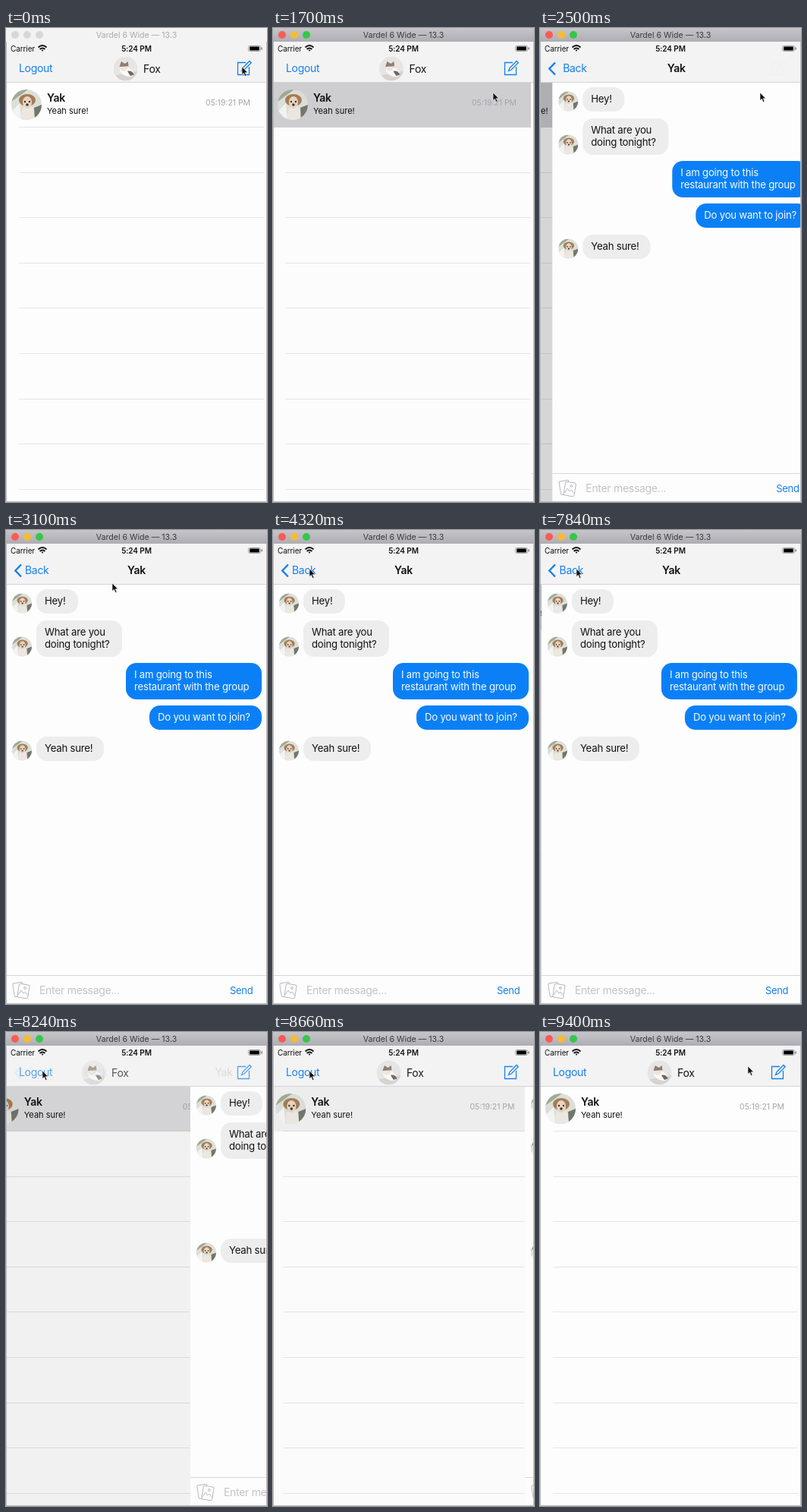
Recreate the animation shown at these times as an HTML page. Size 344x624 px, loop 9420 ms.

```html
<!DOCTYPE html>
<html lang="en">
<head>
<meta charset="utf-8">
<title>Chat navigation</title>
<style>
  html, body { margin: 0; width: 100%; height: 100%; overflow: hidden; background: #fdfdfd; }
  svg { display: block; width: 344px; height: 624px; }
  text { font-family: Inter, Roboto, sans-serif; font-size: 14px; letter-spacing: -.3px; fill: #111; }
  .bold { font-weight: 600; }
  .mid { text-anchor: middle; }
  .blue { fill: #147fec; }
  .msg { font-size: 13.2px; letter-spacing: -.23px; }
  .small { font-size: 11px; letter-spacing: 0; }
  .bar { font-size: 10px; letter-spacing: -.1px; }
  .line { fill: none; stroke: #147fec; }
</style>
</head>
<body>
<svg viewBox="0 0 344 624">
  <defs>
    <clipPath id="content"><rect y="71" width="344" height="553"/></clipPath>
    <clipPath id="disc"><circle r="20"/></clipPath>
    <linearGradient id="steel" x2="0" y2="1">
      <stop stop-color="#c6c5ca"/><stop offset="1" stop-color="#aeadb3"/>
    </linearGradient>
    <g id="pup" clip-path="url(#disc)">
      <rect x="-20" y="-20" width="40" height="40" fill="#dcdfd9"/>
      <path d="M-20 -4L2 -20H-14L-20 -14Z" fill="#9fab94"/>
      <path d="M-20 9L-9 -2L-7 20H-20Z" fill="#f3f3f2"/>
      <ellipse cx="2" cy="13" rx="9" ry="12" fill="#ece7e0"/>
      <ellipse cx="1" cy="-6" rx="11" ry="8" fill="#a67c56"/>
      <ellipse cx="1" cy="-3" rx="6" ry="8" fill="#e6d5c1"/>
      <circle cx="-2" cy="-4" r="1.2" fill="#3b3028"/>
      <circle cx="4" cy="-4" r="1.2" fill="#3b3028"/>
      <circle cx="1" cy="0" r="1.7" fill="#3b3028"/>
      <path d="M10 4L20 0V20H11Z" fill="#72776e"/>
    </g>
    <g id="kit" clip-path="url(#disc)">
      <rect x="-20" y="-20" width="40" height="40" fill="#e7e5e3"/>
      <path d="M-20 12L20 4V20H-20Z" fill="#d6d3cf"/>
      <ellipse cx="4" cy="4" rx="12" ry="7" fill="#faf9f7" transform="rotate(24)"/>
      <circle cx="-3" cy="-3" r="7" fill="#efe5dd"/>
      <path d="M-10 -3L-7 -12L-1 -8L4 -12L5 -4Z" fill="#8d7d72"/>
      <path d="M3 4Q11 2 14 10L8 12Z" fill="#6c6765"/>
    </g>
  </defs>

  <rect width="344" height="624" fill="#fdfdfd"/>
  <g clip-path="url(#content)">
    <g id="list">
      <rect y="71" width="344" height="553" fill="#fdfdfd"/>
      <g id="rules"></g>
      <rect id="row" y="72" width="341" height="59" fill="#cfcfd2"/>
      <use href="#pup" x="27" y="101"/>
      <text class="bold" x="54" y="97">Yak</text>
      <text class="small" x="54" y="113">Yeah sure!</text>
      <text class="small" x="322" y="102" text-anchor="end" style="font-size:10.4px;fill:#a6a6ab">05:19:21 PM</text>
      <rect id="dim" y="71" width="344" height="553"/>
    </g>
    <g id="chat">
      <rect y="71" width="344" height="553" fill="#fdfdfd"/>
      <g id="talk"></g>
      <rect y="586" width="344" height="1" fill="#d6d6dc"/>
      <g fill="#fdfdfd" stroke="#b9b9be">
        <rect x="10" y="596" width="13" height="18" rx="2" transform="rotate(-9 16 605)"/>
        <rect x="16" y="598" width="14" height="18" rx="2" transform="rotate(9 23 607)"/>
        <path d="M16 612l4 -6 3 4 2 -2 4 5" fill="none"/>
        <circle cx="25" cy="603" r="1.4"/>
      </g>
      <text x="44" y="611" style="fill:#c3c3c9">Enter message...</text>
      <text class="blue" x="295" y="611" style="font-size:13px">Send</text>
    </g>
  </g>

  <rect y="18" width="344" height="53" fill="#f3f3f4"/>
  <rect y="71" width="344" height="1" fill="#d4d4d8"/>
  <g id="listBar">
    <text class="blue" x="17" y="58">Logout</text>
    <g id="owner">
      <use href="#kit" transform="translate(157.5 53.5) scale(.8)"/>
      <text x="181" y="59">Fox</text>
    </g>
    <g class="line" stroke-width="1.3">
      <path d="M316 45.5H305.500V61.500H320.500V51"/>
      <path d="M310.500 56.500L312 52.500L321 43.500L323.200 45.700L314.300 54.800Z" fill="#f3f3f4"/>
    </g>
  </g>
  <g id="chatBar">
    <path class="line" d="M20 45.500L12.300 53.500L20 61.500" stroke-width="2.400"/>
    <text id="back" class="blue" x="25" y="58">Back</text>
    <text id="peer" class="bold mid" x="172" y="58">Yak</text>
  </g>

  <text class="bar" x="6" y="30.500">Carrier</text>
  <g fill="none" stroke="#111" stroke-width="1.900">
    <path d="M42.500 25.500Q48 20.500 53.500 25.500M44.600 28Q48 25 51.400 28"/>
    <path d="M46.500 28.700H49.500L48 31Z" fill="#111" stroke="none"/>
  </g>
  <text class="bar bold mid" x="172" y="30.500">5:24 PM</text>
  <rect x="319.500" y="23.500" width="16" height="7" rx="2" fill="none" stroke="#88888c" stroke-width=".8"/>
  <rect x="321" y="24.500" width="13" height="5" rx="1"/>
  <rect x="336.500" y="25.500" width="1.300" height="3" fill="#747478"/>

  <rect id="frame" width="344" height="18"/>
  <g id="lights"></g>
  <text id="device" class="mid" x="172" y="13" style="font-size:10.600px;letter-spacing:0">Vardel 6 Wide — 13.3</text>
  <path d="M.5 18V623.500H343.500V18" fill="none" stroke="#b9b9be"/>
  <path id="mouse" d="M0 0V10.500L2.400 8.300L4.200 12.500L6 11.700L4.200 7.700H7.500Z" fill="#111" stroke="#fdfdfd" stroke-width=".6"/>
</svg>
<script>
const LOOP = 9420, PUSH = 1723, POP = 7838, SLIDE = 1350;
const FOCUS = 1540, PRESS = 1630;
const $ = id => document.getElementById(id);
const clamp = x => Math.min(1, Math.max(0, x));

function add(parent, tag, attrs, text) {
  const el = document.createElementNS("http://www.w3.org/2000/svg", tag);
  for (const key in attrs) el.setAttribute(key, attrs[key]);
  if (text) el.textContent = text;
  return $(parent).appendChild(el);
}

for (let i = 0; i < 9; i++) {
  add("rules", "rect", {
    x: 17, y: Math.round(130 + i * 59.6), width: 323, height: 1, fill: "#e4e4ec"
  });
}

const lamps = [12, 28, 44].map(cx => add("lights", "circle", { cx, cy: 9, r: 5 }));

// x, y, width, own message, lines
const talk = [
  [40, 78, 55, false, "Hey!"],
  [40, 119, 113, false, "What are you", "doing tonight?"],
  [158, 175, 179, true, "I am going to this", "restaurant with the group"],
  [189, 231, 148, true, "Do you want to join?"],
  [40, 272, 89, false, "Yeah sure!"]
];
for (const [x, y, width, own, ...lines] of talk) {
  const height = 16 + 16 * lines.length;
  add("talk", "rect", { x, y, width, height, rx: 14, fill: own ? "#0b80f6" : "#ededee" });
  lines.forEach((line, i) => add("talk", "text", {
    class: "msg", x: x + 11, y: y + 19.5 + i * 16, style: own ? "fill:#f6faff" : ""
  }, line));
  if (!own) add("talk", "use", {
    href: "#pup", transform: `translate(21 ${y + height - 13.5}) scale(.65)`
  });
}

// time, x, y
const path = [
  [0, 311, 51], [500, 311, 51], [1300, 290, 85], [2640, 290, 85],
  [3127, 140, 70], [4300, 48, 51], [8750, 48, 51], [9427, 274, 45]
];

function pointer(t) {
  const i = Math.max(1, path.findIndex(p => p[0] > t));
  const [t0, x0, y0] = path[i - 1], [t1, x1, y1] = path[i];
  const p = clamp((t - t0) / (t1 - t0));
  const e = p * p * (3 - 2 * p);
  return [x0 + (x1 - x0) * e, y0 + (y1 - y0) * e];
}

function captured(t) {
  const r = t % 140;
  return t - r + (r < 20 ? 0 : r < 120 ? 1 : 2) * 140 / 3;
}

const slide = (t, start) => 1 - (1 - clamp((t - start) / SLIDE)) ** 3.76;
const move = (id, x, y = 0) => $(id).setAttribute("transform", `translate(${x.toFixed(2)} ${y.toFixed(2)})`);
const fade = (id, a) => $(id).setAttribute("opacity", clamp(a).toFixed(3));

function draw(t) {
  const p = t < POP ? slide(t, PUSH) : 1 - slide(t, POP);
  const rest = 1 - p;
  move("list", -103 * p);
  move("chat", 344 * rest);
  move("owner", -143 * p);
  move("back", 110 * rest);
  move("peer", 163 * rest);
  fade("dim", p * .16);
  fade("row", t < PRESS ? 0 : 1 - (t - POP) / 1150);
  fade("listBar", 1 - p * 1.03);
  fade("chatBar", (p - .24) / .7);
  move("mouse", ...pointer(t));

  const active = t >= FOCUS;
  $("frame").setAttribute("fill", active ? "url(#steel)" : "#f3f3f4");
  $("device").style.fill = active ? "#3a3a3e" : "#aaaaae";
  const colors = active ? ["#fc5a55", "#f5bb35", "#34c749"] : Array(3).fill("#d7d7da");
  lamps.forEach((lamp, i) => lamp.setAttribute("fill", colors[i]));
}

const begin = performance.now();
function tick() {
  draw(captured((performance.now() - begin) % LOOP));
  requestAnimationFrame(tick);
}
tick();
</script>
</body>
</html>
```
